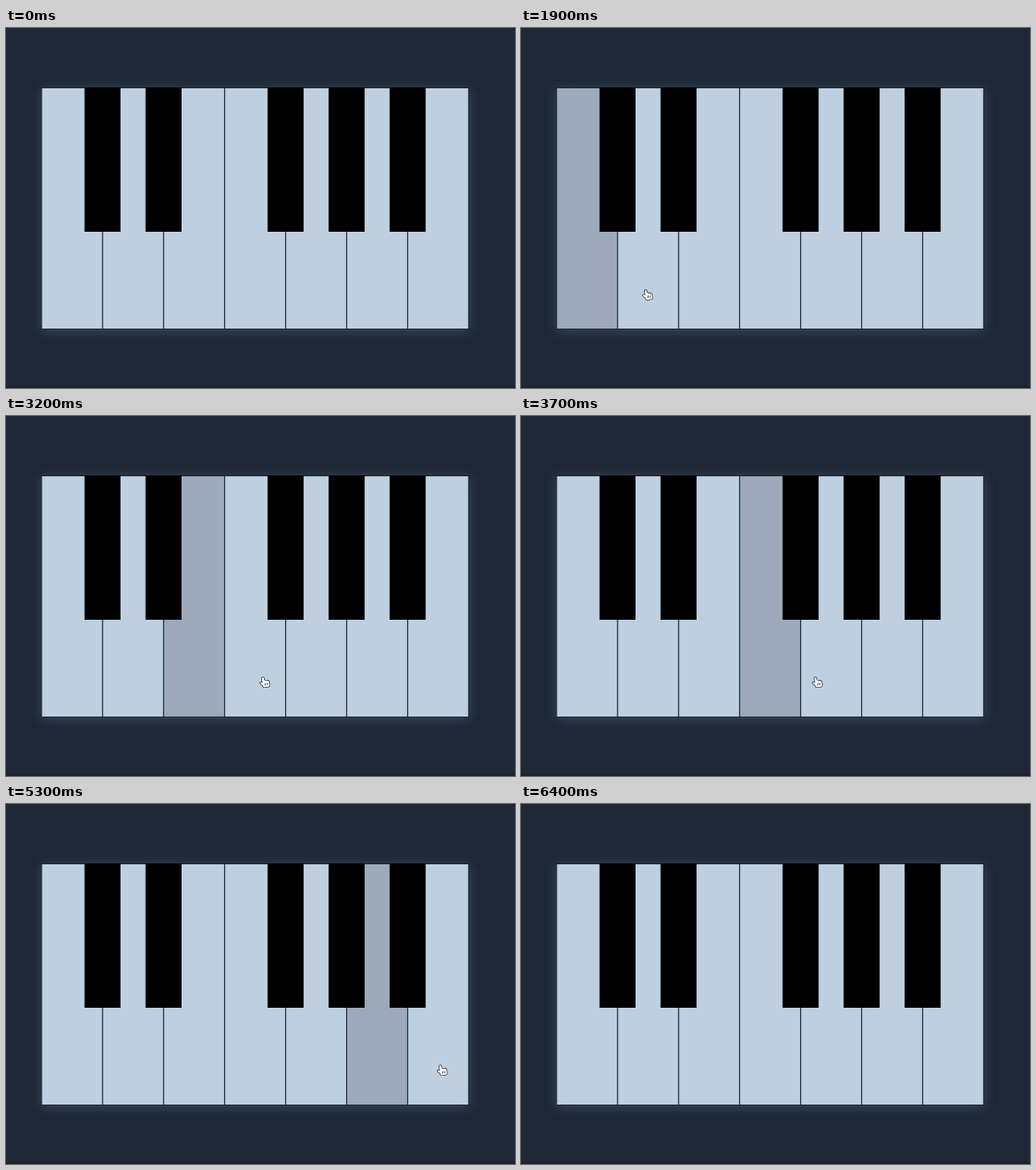
An HTML page with a canvas for the animation above (8400 ms loop, 600 by 424 pixels).

```html
<!DOCTYPE html>
<html lang="en">
<head>
<meta charset="utf-8">
<title>Piano keys</title>
<style>
  html, body { margin: 0; width: 100%; height: 100%; overflow: hidden; background: #1e2836; }
  canvas { display: block; }
</style>
</head>
<body>
<canvas id="stage" width="600" height="424"></canvas>
<script>
const ctx = document.getElementById('stage').getContext('2d');
const LOOP = 8400;
const TICK = 100;
const HOLD = 800;
const ENTER = 500;
const LEAVE = 5900;

const LEFT = 42.5;
const TOP = 71;
const PITCH = 71.93;
const BACK = '#1e2836';
const KEY = '#becfe0';
const PRESSED = '#9eaabb';

// When each key is pressed, and where the pointer rests for it
const presses = [1300, 2000, 2800, 3500, 4100, 4800, 5600];
const rests = [62, 143, 228, 299, 354, 434, 508];

const easeOut = u => 1 - (1 - u) ** 2;

function glide(from, to, start, duration, t) {
  const u = Math.min(Math.max((t - start) / duration, 0), 1);
  return from + (to - from) * easeOut(u);
}

// After a press the pointer spends 60% of the pause gliding to the next key.
function pointerX(t) {
  const key = presses.findLastIndex(start => t >= start);
  if (key < 0) return glide(30, rests[0], ENTER, 500, t);
  if (key === presses.length - 1) return glide(rests[key], 574, presses[key], 200, t);
  const pause = presses[key + 1] - presses[key];
  return glide(rests[key], rests[key + 1], presses[key], 0.6 * pause, t);
}

// It rises from the lower left and levels off.
const pointerY = x => 306.5 + 5 * Math.exp((62 - x) / 40);

function rect(x, y, w, h, color) {
  ctx.fillStyle = color;
  ctx.fillRect(x, y, w, h);
}

function drawKeyboard(t) {
  ctx.save();
  ctx.shadowColor = 'rgba(150, 180, 195, 0.24)';
  ctx.shadowBlur = 14;
  ctx.shadowOffsetY = 2;
  rect(LEFT - 1, TOP - 1, 504.5, 285, BACK);
  ctx.restore();

  presses.forEach((start, i) => {
    const down = t >= start && t < start + HOLD;
    rect(LEFT + PITCH * i, TOP, 70.7, 283, down ? PRESSED : KEY);
    const hasSharp = i % 4 !== 2 && i < 6;
    if (hasSharp) sharps.push(i);
  });
}

function drawSharps() {
  for (let i = 0; i < 6; i++) {
    if (i !== 2) rect(LEFT + 50.1 + PITCH * i, TOP - 1, 42.4, 170, '#000');
  }
}

function handShape() {
  const shape = new Path2D();
  shape.roundRect(3.2, 0.6, 2.4, 9, 1.2);
  for (let finger = 0; finger < 3; finger++) {
    shape.roundRect(5 + 1.9 * finger, 4.4 + 0.5 * finger, 2.2, 5, 1.1);
  }
  shape.roundRect(3.2, 6.6, 7.8, 5.8, 1.6);
  shape.ellipse(2.5, 7.9, 2.6, 1.1, 0.75, 0, 2 * Math.PI);
  return shape;
}

const hand = handShape();

function drawHand(x, y) {
  ctx.save();
  ctx.translate(x - 0.6, y + 1.3);
  ctx.rotate(-0.14);
  ctx.lineWidth = 1.3;
  ctx.strokeStyle = '#14181e';
  ctx.stroke(hand);
  ctx.fillStyle = '#fff';
  ctx.fill(hand);
  for (let crease = 0; crease < 3; crease++) {
    rect(5.3 + 1.7 * crease, 7.8, 0.6, 2.8, '#14181e');
  }
  ctx.restore();
}

function draw(now) {
  const t = Math.floor((now % LOOP) / TICK) * TICK;
  rect(0, 0, 600, 424, BACK);
  rect(0, 422, 600, 2, '#1a2130');
  drawKeyboard(t);
  drawSharps();
  if (t >= ENTER && t < LEAVE) {
    const x = pointerX(t);
    drawHand(x, pointerY(x));
  }
}

const sharps = [];
const origin = performance.now();
function loop() {
  draw(performance.now() - origin);
  requestAnimationFrame(loop);
}
loop();
</script>
</body>
</html>
```
